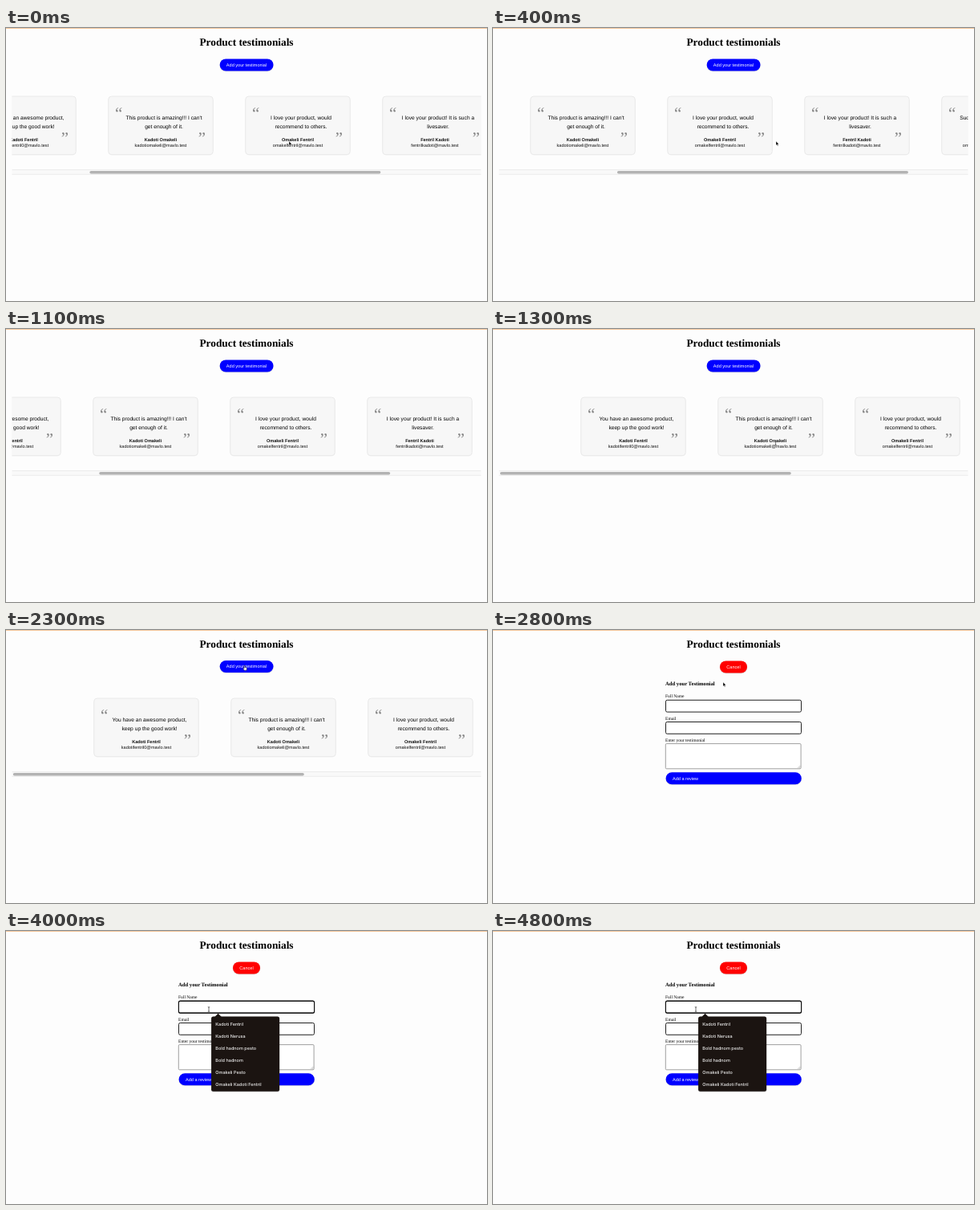
Recreate the animation shown at these times as an HTML page. Size 600x340 px, loop 5000 ms.

```html
<!DOCTYPE html>
<html lang="en">
<head>
<meta charset="utf-8">
<title>Product testimonials</title>
<style>
  html, body { margin: 0; width: 100%; height: 100%; overflow: hidden; background: #fdfdfd; }
  svg { display: block; width: 600px; height: 340px; }
  text { text-rendering: geometricPrecision; white-space: pre; }
  .sans { font-family: "Liberation Sans", Arial, sans-serif; }
  .serif { font-family: "Liberation Serif", "Times New Roman", serif; }
  .menu { font-family: Inter, sans-serif; }
  .bold { font-weight: 700; }
  .medium { font-weight: 500; }
  .mid { text-anchor: middle; }
</style>
</head>
<body>
<svg id="stage" viewBox="0 0 600 340" xmlns="http://www.w3.org/2000/svg"></svg>
<script>
const LOOP = 5000;
const SMALL = 5.555, BODY = 6.667;
const FIRST_CARD = 109.5, CARD_PITCH = 171, CARD_W = 131;
const THUMB_RATIO = 0.6245;

// Each track is a list of [time, value] pairs; a value holds until the next one.
const scrollTrack = [
  [0, 153], [100, 160], [200, 175], [300, 198], [400, 234], [500, 296], [600, 351],
  [900, 351.5], [1000, 302], [1100, 172], [1200, 48], [1300, 0]
];
const cursorTrack = [
  [0, ["arrow", 353, 141]], [600, ["none", 0, 0]], [1300, ["beam", 352.6, 142]],
  [1500, ["arrow", 350, 134]], [1600, ["arrow", 340, 115]], [1700, ["arrow", 325, 90]],
  [1800, ["arrow", 311, 67]], [1900, ["hand", 301, 51]], [2000, ["hand", 298, 47]],
  [2700, ["arrow", 295, 55]], [2800, ["arrow", 287, 65]], [2900, ["arrow", 276, 77]],
  [3000, ["beam", 264, 90]], [3100, ["beam", 257, 96]], [3200, ["beam", 253.5, 98.5]],
  [4000, ["beam", 253, 97.5]]
];
const caretTrack = [[0, false], [3300, true], [3800, false], [4300, true], [4800, false]];
const formTrack = [[0, false], [2400, true]];
const menuTrack = [[0, false], [3300, true]];
const hoverTrack = [[0, false], [2000, true], [2400, false]];

const cards = [
  ["You have an awesome product,", "keep up the good work!", "Kadoti Fentril", "kadotifentril0"],
  ["This product is amazing!!! I can't", "get enough of it.", "Kadoti Omakeli", "kadotiomakeli"],
  ["I love your product, would", "recommend to others.", "Omakeli Fentril", "omakelfentril"],
  ["I love your product! It is such a", "livesaver.", "Fentril Kadoti", "fentrilkadoti"],
  ["Such an amazing product, keep", "up the good work.", "Omakeli Kadoti Fentril", "omakelikadotifentril"]
];
const suggestions = [
  "Kadoti Fentril", "Kadoti Nerusa", "Bold hadnom pesto",
  "Bold hadnom", "Omakeli Pesto", "Omakeli Kadoti Fentril"
];

const text = (x, y, size, cls, str, fill = "#000") =>
  `<text x="${x}" y="${y}" font-size="${size}" class="${cls}" fill="${fill}">${str}</text>`;

const box = (x, y, w, h, r, fill, stroke = "none", line = 0) =>
  `<rect x="${x}" y="${y}" width="${w}" height="${h}" rx="${r}" fill="${fill}" stroke="${stroke}" stroke-width="${line}"/>`;

const pill = (x, y, w, fill) =>
  box(x - 0.3, y + 0.5, w + 0.6, 15.3, 7.6, "#00000022") + box(x, y, w, 15, 7.5, fill);

function card([line1, line2, name, mail], i) {
  const mid = CARD_W / 2;
  return `<g transform="translate(${FIRST_CARD + i * CARD_PITCH} 0)">` +
    box(-0.3, 84.7, CARD_W + 0.6, 73.7, 4.4, "#00000008") +
    box(0.3, 85.1, CARD_W - 0.6, 72.6, 4, "#f7f7f7", "#e6e6e6", 0.8) +
    text(8.6, 112.6, 20.83, "serif", "\u201c", "#858585") +
    text(112.2, 144, 20.83, "serif", "\u201d", "#858585") +
    text(mid + 4, 114.4, BODY, "sans mid", line1) +
    text(mid + 4, 125.1, BODY, "sans mid", line2) +
    text(mid, 141.4, SMALL, "sans bold mid", name, "#111") +
    text(mid, 147.5, SMALL, "sans mid", mail + "@mavlo.test", "#111") +
    `</g>`;
}

const listView = `<g id="list">
  <g id="addButton">${pill(266.7, 38.4, 66.8, "#0000ff")}
    ${text(300, 47.5, SMALL, "sans mid", "Add your testimonial", "#fff")}</g>
  <g clip-path="url(#view)"><g id="row">${cards.map(card).join("")}</g></g>
  ${box(7.5, 176.5, 585, 6, 0, "#f9f9f9")}
  <path d="M7.5 176.6H592.5M7.5 182.3H592.5" stroke="#e6e6e6" stroke-width=".7"/>
  <g id="thumb">${box(8.8, 177.9, 363, 3.5, 1.75, "#b3b3b3")}</g>
</g>`;

const menu = `<g id="menu">
  ${box(255.8, 106.8, 85.6, 93.6, 2.8, "#00000030")}
  <path d="M260.3 107L264.6 102.8L268.9 107Z" fill="#1b1411"/>
  ${box(256.1, 106.5, 85, 93.3, 2.5, "#1b1411")}
  ${suggestions.map((s, i) => text(261.3, 117.6 + i * 15, 5.5, "menu medium", s, "#ededed")).join("")}
</g>`;

const formView = `<g id="form">
  ${pill(283, 38.4, 34, "#ff0000")}
  ${text(300, 47.5, SMALL, "sans mid", "Cancel", "#fff")}
  ${text(215, 69, BODY, "serif bold", "Add your Testimonial")}
  ${text(215, 84.4, SMALL, "serif", "Full Name")}
  ${box(215.5, 87.3, 169, 14.8, 1.8, "#fff", "#222", 1)}
  ${text(215, 111.8, SMALL, "serif", "Email")}
  ${box(215.5, 114.5, 169, 14.8, 1.8, "#fff", "#222", 1)}
  ${text(215, 139.1, SMALL, "serif", "Enter your testimonial")}
  ${box(215.3, 141.6, 168.8, 31.2, 1.2, "#fff", "#777", 0.7)}
  <path d="M380.3 172L383.4 168.9M382 172L383.4 170.6" stroke="#888" stroke-width=".5"/>
  ${pill(215.6, 177.2, 169.2, "#0000ff")}
  ${text(224, 186.5, SMALL, "sans", "Add a review", "#fff")}
  <g id="focus">${box(215.4, 87.2, 169.2, 15, 1.9, "none", "#111", 1.2)}</g>
  <path id="caret" d="M217.1 91.4V98" stroke="#333" stroke-width=".6"/>
  ${menu}
</g>`;

const cursors = `
  <path id="arrow" d="M0 0V5.2L1.2 4.1L2 6L2.9 5.6L2.1 3.8H3.7Z" fill="#000" stroke="#fff" stroke-width=".4"/>
  <g id="beam" fill="none">
    <path d="M-1.2 -3Q0 -3 0 -2V2Q0 3 -1.2 3M1.2 -3Q0 -3 0 -2M0 2Q0 3 1.2 3" stroke="#fff" stroke-width="1.1"/>
    <path d="M-1.2 -3Q0 -3 0 -2V2Q0 3 -1.2 3M1.2 -3Q0 -3 0 -2M0 2Q0 3 1.2 3" stroke="#111" stroke-width=".6"/>
  </g>
  <path id="hand" d="M-.9 -2.6Q-.4 -3.2 .1 -2.6V-.6L2 -.1Q2.7 .2 2.5 1L2 3.2H-.7L-2.3 .9Q-2.2 .1 -1.5 .4L-.9 .9Z"
    fill="#fff" stroke="#111" stroke-width=".5"/>`;

const stage = document.getElementById("stage");
stage.innerHTML = `
  <defs><clipPath id="view"><rect x="7.5" y="80" width="585" height="96"/></clipPath></defs>
  ${box(0, 0, 600, 340, 0, "#fdfdfd")}
  ${box(0, 0, 600, 1, 0, "#f6c89d")}
  ${text(300, 21.8, 13.333, "serif bold mid", "Product testimonials")}
  ${listView}${formView}${cursors}`;

const el = id => document.getElementById(id);
const show = (id, on) => { el(id).style.display = on ? "" : "none"; };
const move = (id, x, y) => el(id).setAttribute("transform", `translate(${x} ${y})`);

function valueAt(track, t) {
  let value = track[0][1];
  for (const [time, v] of track) if (time <= t) value = v;
  return value;
}

function draw(t) {
  const scroll = valueAt(scrollTrack, t);
  move("row", -scroll, 0);
  move("thumb", scroll * THUMB_RATIO, 0);
  move("addButton", 0, valueAt(hoverTrack, t) ? -0.4 : 0);

  const formOpen = valueAt(formTrack, t);
  const menuOpen = valueAt(menuTrack, t);
  show("list", !formOpen);
  show("form", formOpen);
  show("menu", menuOpen);
  show("focus", menuOpen);
  show("caret", valueAt(caretTrack, t));

  const [kind, x, y] = valueAt(cursorTrack, t);
  for (const id of ["arrow", "beam", "hand"]) {
    show(id, id === kind);
    move(id, x, y);
  }
}

const start = performance.now();
function tick() {
  draw((performance.now() - start) % LOOP);
  requestAnimationFrame(tick);
}
tick();
</script>
</body>
</html>
```
